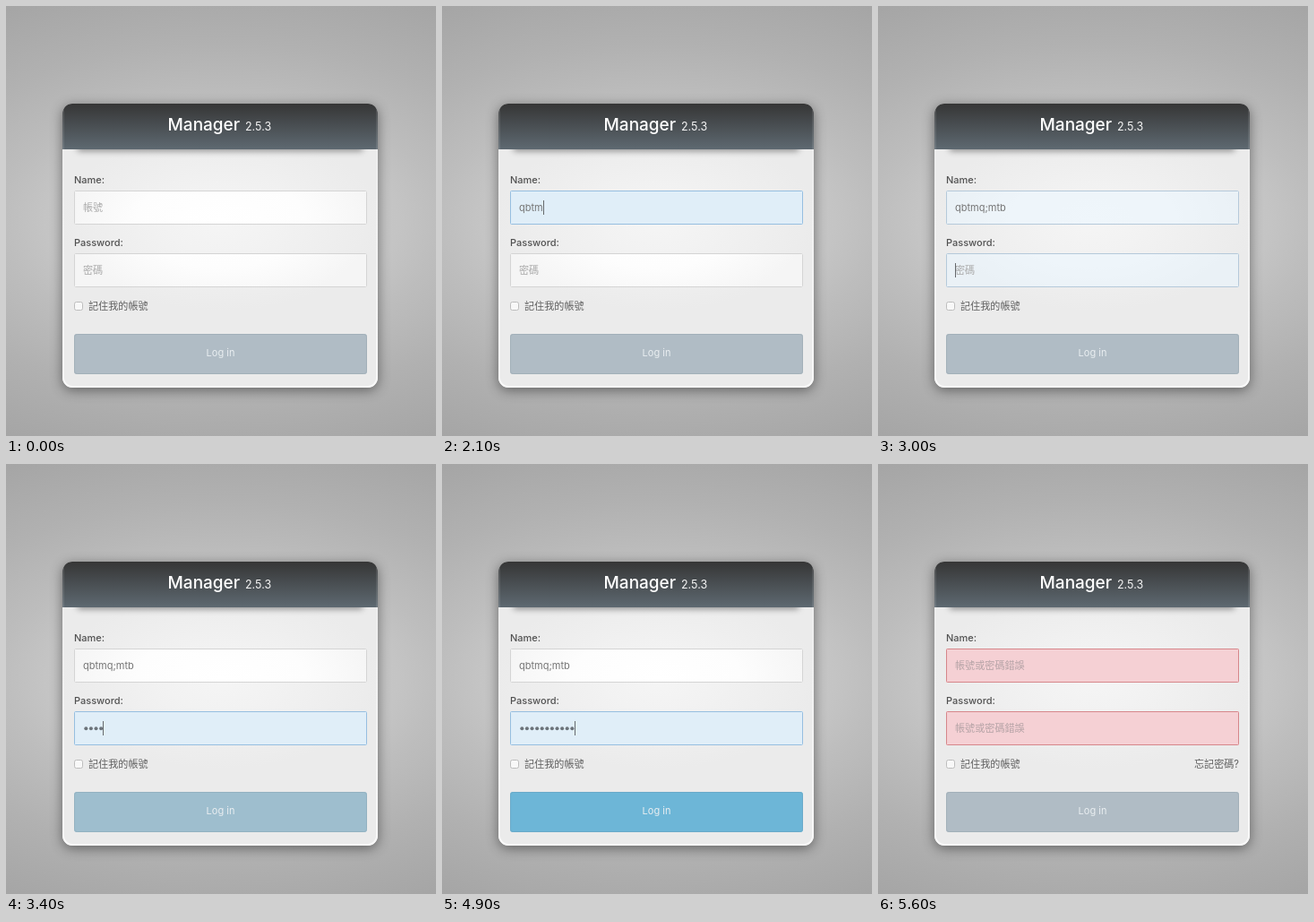
These frames come from a looping animation (480 px wide and 480 px high, 6 s). An HTML page with a canvas:

```html
<!DOCTYPE html>
<html lang="zh-Hant">
<head>
<meta charset="utf-8">
<title>Login form</title>
<style>
html, body { margin: 0; width: 100%; height: 100%; overflow: hidden; background: #b0b0b0; }
canvas { display: block; width: 480px; height: 480px; }
</style>
</head>
<body>
<canvas id="stage"></canvas>
<script>
const LOOP = 6000, STEP = 100;
const SANS = 'Inter, "Noto Sans CJK TC", "Noto Sans CJK JP", "Noto Sans CJK", sans-serif';
const USER = 'qbtmq;mtb';
const ERROR = '帳號或密碼錯誤';
const BLUE = [224, 238, 248], BLUE_EDGE = [150, 190, 224];
const RED = [245, 208, 212], RED_EDGE = [214, 134, 138];
const GREY_BTN = [176, 188, 197], READY_BTN = [132, 194, 220], HOVER_BTN = [109, 182, 215];

const canvas = document.getElementById('stage');
const dpr = window.devicePixelRatio || 1;
canvas.width = canvas.height = 480 * dpr;
const ctx = canvas.getContext('2d');

const clamp = v => Math.max(0, Math.min(1, v));
const ramp = (t, from, to) => clamp((t - from) / (to - from));
const mix = (a, b, k) => a.map((v, i) => v + (b[i] - v) * k);
const rgb = (c, a = 1) => `rgba(${c.map(Math.round).join(',')},${a})`;
const between = (t, a, b) => t >= a && t < b;

// Number of characters present, from [time, count] pairs
const typed = (t, keys) => keys.reduce((n, [at, count]) => t >= at ? count : n, 0);
const NAME_KEYS = [[1900, 1], [2000, 3], [2100, 4], [2200, 7], [2300, 9]];
const PASS_KEYS = [[3300, 2], [3400, 4], [3500, 7], [3600, 9], [3700, 11]];

function stateAt(t) {
  const error = t < 5100 ? 0 : ramp(t, 5000, 5300);
  const failed = t >= 5100;
  const nameFocus = ramp(t, 1500, 1700) * (1 - ramp(t, 2900, 3100));
  const passFocus = ramp(t, 2900, 3100) * (1 - error);
  let button = mix(GREY_BTN, READY_BTN, ramp(t, 3200, 3700));
  button = mix(button, HOVER_BTN, ramp(t, 4600, 4900));
  button = mix(button, GREY_BTN, error);
  return {
    error, failed, nameFocus, passFocus, button,
    shake: between(t, 5100, 5200) ? 6 : between(t, 5200, 5300) ? -2 : 0,
    name: failed ? 0 : typed(t, NAME_KEYS),
    pass: failed ? 0 : typed(t, PASS_KEYS),
    nameCaret: between(t, 1400, 2800),
    passCaret: between(t, 3000, 4200) || between(t, 4700, 5100)
  };
}

function roundBox(x, y, w, h, r) {
  ctx.beginPath();
  ctx.roundRect(x, y, w, h, r);
}

// Fills the current path with a wide elliptical light around the centre
function fillGlow(radius, stops) {
  ctx.save();
  ctx.translate(240, 240);
  ctx.scale(1.8, 1);
  const g = ctx.createRadialGradient(0, 0, 0, 0, 0, radius);
  stops.forEach(([at, color]) => g.addColorStop(at, color));
  ctx.fillStyle = g;
  ctx.fill();
  ctx.restore();
}

function text(str, x, y, size, color, weight = 400, align = 'left') {
  ctx.font = `${weight} ${size}px ${SANS}`;
  ctx.fillStyle = color;
  ctx.textAlign = align;
  ctx.fillText(str, x, y);
  return ctx.measureText(str).width;
}

function linear(y0, y1, from, to) {
  const g = ctx.createLinearGradient(0, y0, 0, y1);
  g.addColorStop(0, from);
  g.addColorStop(1, to);
  return g;
}

function caret(x, y) {
  ctx.fillStyle = '#66696c';
  ctx.fillRect(x, y, 1, 16);
}

function field(y, focus, error) {
  roundBox(76, y, 327, 38, 1);
  fillGlow(95, [[0, '#ffffff'], [0.55, '#fdfdfd'], [1, '#f5f5f5']]);
  ctx.fillStyle = rgb(BLUE, focus);
  ctx.fill();
  ctx.fillStyle = rgb(RED, error);
  ctx.fill();
  const edge = mix(mix([212, 212, 212], BLUE_EDGE, focus), RED_EDGE, error);
  roundBox(76.5, y + 0.5, 326, 37, 1);
  ctx.lineWidth = 1;
  ctx.strokeStyle = rgb(edge);
  ctx.stroke();
}

function backdrop() {
  ctx.beginPath();
  ctx.rect(0, 0, 480, 480);
  fillGlow(275, [[0, '#d0d0d0'], [0.4, '#c4c4c4'], [0.5, '#bdbdbd'], [0.72, '#b1b1b1'], [1, '#a5a5a5']]);
}

function cardBase() {
  ctx.save();
  ctx.shadowColor = 'rgba(0,0,0,.45)';
  ctx.shadowBlur = 14 * dpr;
  ctx.shadowOffsetY = 3 * dpr;
  roundBox(63, 109, 352, 317, 11);
  ctx.fillStyle = '#ebebeb';
  ctx.fill();
  ctx.restore();

  ctx.save();
  roundBox(63, 109, 352, 317, 11);
  ctx.clip();
  fillGlow(100, [[0, '#f5f5f5'], [0.35, '#f2f2f2'], [1, '#ebebeb']]);

  // Soft shadow under the header, narrower than the card
  ctx.save();
  ctx.shadowColor = 'rgba(0,0,0,.4)';
  ctx.shadowBlur = 7 * dpr;
  ctx.shadowOffsetY = 2 * dpr;
  ctx.fillStyle = '#59636b';
  ctx.fillRect(80, 140, 318, 20);
  ctx.restore();

  ctx.fillStyle = linear(109, 160, '#363636', '#5e6971');
  ctx.fillRect(63, 109, 352, 51);

  roundBox(64, 100, 350, 325, 10);
  ctx.lineWidth = 2;
  ctx.strokeStyle = linear(160, 426, 'rgba(255,255,255,.1)', 'rgba(255,255,255,.65)');
  ctx.stroke();
  ctx.restore();
}

function nameField(s) {
  text('Name:', 76, 198, 11, '#505050', 500);
  field(206, s.nameFocus, s.error);
  const value = USER.slice(0, s.name);
  let width = 0;
  if (s.failed) text(ERROR, 86, 229, 11.1, '#b5a3a6');
  else if (value) width = text(value, 86, 229, 11, '#757575');
  else text('帳號', 86, 229, 11.1, '#aaaaaa');
  if (s.nameCaret) caret(Math.round(86 + width), 217);
}

function passField(s) {
  text('Password:', 76, 268, 11, '#505050', 500);
  field(276, s.passFocus, s.error);
  if (s.failed) text(ERROR, 86, 299, 11.1, '#b5a3a6');
  else if (!s.pass) text('密碼', 86, 299, 11.1, '#aaaaaa');
  ctx.fillStyle = '#6c737a';
  for (let i = 0; i < s.pass; i++) {
    ctx.beginPath();
    ctx.arc(89.3 + i * 5.6, 295.3, 2, 0, Math.PI * 2);
    ctx.fill();
  }
  if (s.passCaret) caret(Math.round(86 + s.pass * 5.62), 287);
}

function options(s) {
  roundBox(76.5, 330.5, 9, 9, 2);
  ctx.fillStyle = '#f8f8f8';
  ctx.fill();
  ctx.lineWidth = 1;
  ctx.strokeStyle = '#bdbdbd';
  ctx.stroke();
  text('記住我的帳號', 92, 338.5, 11.1, '#606060');
  if (s.failed) text('忘記密碼?', 403, 338.5, 11.1, `rgba(96,96,96,${s.error})`, 400, 'right');
}

function loginButton(s) {
  roundBox(76, 366, 327, 45, 3);
  ctx.fillStyle = rgb(s.button);
  ctx.fill();
  roundBox(76.5, 366.5, 326, 44, 3);
  ctx.lineWidth = 1;
  ctx.strokeStyle = rgb(mix(s.button, [90, 110, 125], 0.16));
  ctx.stroke();
  text('Log in', 239.5, 391, 11, '#e9eef1', 400, 'center');
}

function draw(t) {
  const s = stateAt(t);
  ctx.setTransform(dpr, 0, 0, dpr, 0, 0);
  backdrop();
  ctx.translate(s.shake, 0);
  cardBase();
  text('Manager', 180.5, 139, 19, '#ffffff', 500);
  text('2.5.3', 267, 139, 12.5, '#f4f4f4');
  nameField(s);
  passField(s);
  options(s);
  loginButton(s);
}

function tick() {
  const t = performance.now() % LOOP;
  draw(Math.floor(t / STEP) * STEP);
  requestAnimationFrame(tick);
}
tick();
</script>
</body>
</html>
```
